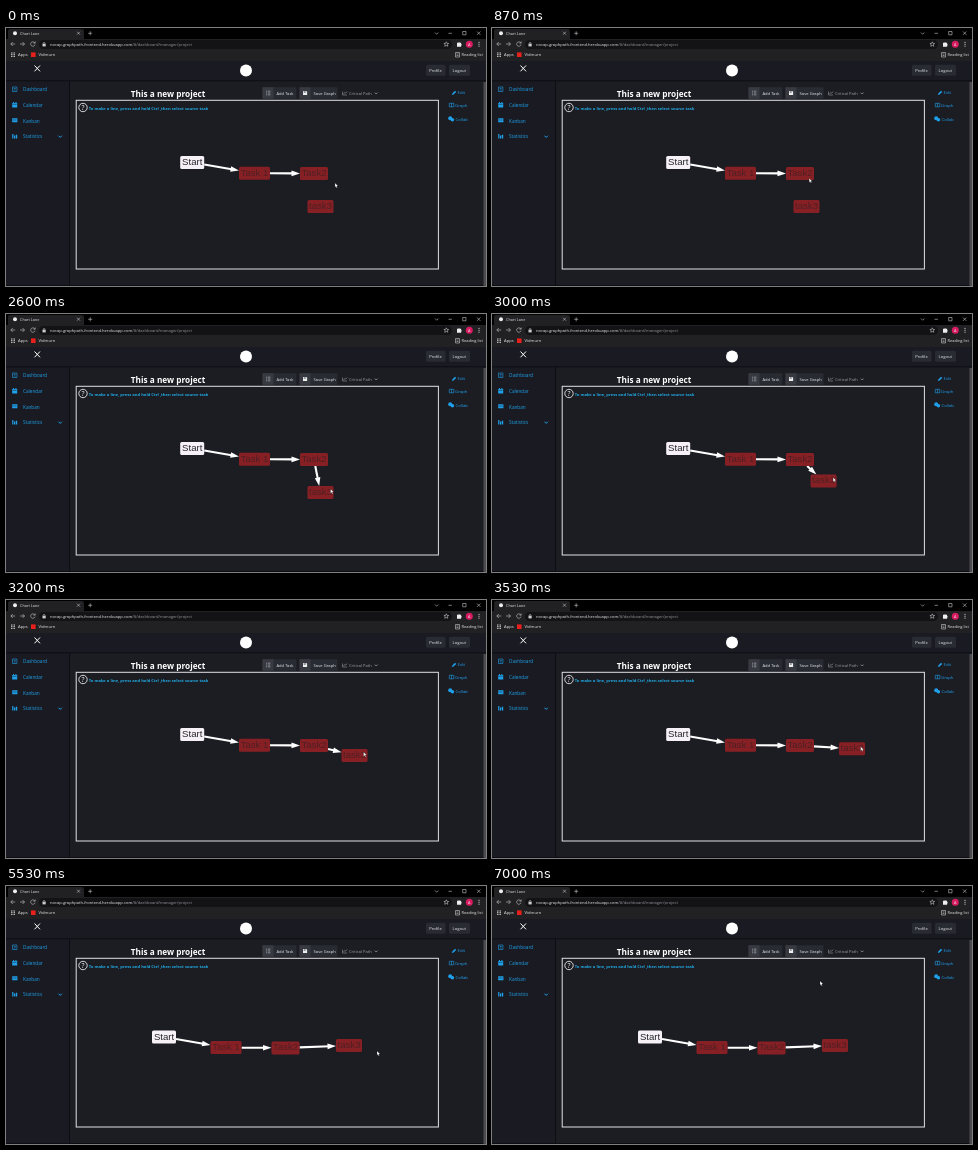
Write an HTML page that moves like this. It is 480 px wide and 258 px high and loops after 7070 ms.

```html
<!DOCTYPE html>
<html lang="en">
<head>
<meta charset="utf-8">
<title>Project graph</title>
<style>
  html, body { margin: 0; width: 100%; height: 100%; overflow: hidden; background: #1c1c23; }
  svg { display: block; width: 100%; height: 100%; }
  text { font-family: "Open Sans", "Noto Sans", sans-serif; font-size: 4.2px; fill: #e8e8ea; }
  .line { fill: none; stroke: #c8c8cc; stroke-width: .6; }
  .blue text { fill: #1fa0ea; font-size: 4.7px; font-weight: 500; }
  .blue .side { font-size: 4.3px; }
  .blue path, .blue circle { fill: #1fa0ea; }
  .blue .line { fill: none; stroke: #1fa0ea; }
  .dim { fill: #94969c; }
  .button { fill: #292b32; }
  .node text { font: 9.6px "Liberation Sans", Arial, sans-serif; fill: #4f1f23; text-anchor: middle; }
</style>
</head>
<body>
<svg viewBox="0 0 480 258">
  <!-- browser -->
  <rect width="480" height="33" fill="#000"/>
  <path d="M2 11V3q0-2 2-2H76q2 0 2 2V11H480V33H0V11Z" fill="#212123"/>
  <rect x="33" y="12" width="413" height="9" rx="4.5" fill="#131315"/>
  <circle cx="9" cy="5.2" r="2" fill="#eee"/>
  <text x="14" y="6.7" style="font-size:3.8px">Chart Lane</text>
  <path class="line" d="M71 3.7l3 3m0-3l-3 3M82.2 5.300h4m-2-2v4M429 4.500l1.700 1.700 1.700-1.700M442.500 5.300h3.400M456.700 3.500h3.300v3.300h-3.300zM471 3.500l3.400 3.400m0-3.400l-3.400 3.400"/>
  <path class="line" d="M9.200 16H4.800m2-2l-2 2 2 2M14 16h4.500m-2-2l2 2-2 2M28.800 15a2.200 2.200 0 1 0 .2 1.600M29.200 13.500v1.700h-1.700"/>
  <path d="M36.500 15.800h3.200v2.600h-3.200z" fill="#ccc"/>
  <path class="line" d="M37.200 16v-1a1 1 0 0 1 1.800 0v1"/>
  <text x="44" y="17.800" style="font-size:4.1px">nocap-graphpath-frontend.herokuapp.com<tspan class="dim">/#/dashboard/manager/project</tspan></text>
  <path class="line" d="M440.300 13.800l.7 1.600 1.700.1-1.300 1.100.4 1.700-1.500-.9-1.500.9.4-1.700-1.300-1.100 1.700-.1z"/>
  <path d="M451 14.800h1.200a.9.900 0 0 1 1.700 0h1.200v1.200a.9.900 0 0 1 0 1.700v1h-4.100z" fill="#eee"/>
  <circle cx="463.300" cy="16.200" r="3.500" fill="#d81b60"/>
  <text x="463.300" y="17.600" text-anchor="middle" style="font-size:3.8px">A</text>
  <path d="M473 13.900v5" stroke="#ddd" stroke-width="1" stroke-dasharray="1 .9"/>
  <path d="M5 25h4M5 26.700h4M5 28.400h4" stroke="#ccc" stroke-width="1" stroke-dasharray="1 .5"/>
  <text x="12" y="28">Apps</text>
  <rect x="25" y="24.400" width="4.600" height="4.600" fill="#e8201c"/>
  <text x="32.500" y="28">Vidmurn</text>
  <path class="line" d="M449.500 24.500h4v4.500h-4zM450.500 26h2M450.500 27.500h2"/>
  <text x="455.500" y="28" style="font-size:4px">Reading list</text>

  <!-- page frame -->
  <rect y="33" width="480" height="20" fill="#1a1b22"/>
  <rect y="53" width="63" height="205" fill="#1a1b22"/>
  <path d="M0 52.800H480M63.500 53V258M0 257.500H480" stroke="#0c0d12" stroke-width="1"/>
  <rect x="477.500" y="54" width="2.500" height="204" fill="#4c4c50"/>
  <path d="M28.500 37.500l5.500 5.800m0-5.800l-5.500 5.800" stroke="#fff" stroke-width="1"/>
  <circle cx="240" cy="42.500" r="6" fill="#fff"/>
  <rect class="button" x="420" y="36.700" width="19.500" height="11" rx="1.500"/>
  <rect class="button" x="443" y="36.700" width="21" height="11" rx="1.500"/>
  <text x="423.200" y="43.800">Profile</text>
  <text x="446.500" y="43.800">Logout</text>

  <!-- menus -->
  <g class="blue">
    <path class="line" d="M6.500 59h4.400v4.500H6.500zM7.700 60.500h2M7.700 62h2"/>
    <path d="M6.200 75h5v4.500h-5zM7 74h1v1h-1zM9.400 74h1v1h-1zM6.200 90.300h5.200v4h-5.200zM6.200 106h1.200v4.600H6.200zM8 107.500h1.200v3.100H8zM9.800 106.700h1.400v3.900h-1.400z"/>
    <path d="M6.700 76.300h4M6.700 92h4" stroke="#1a1b22" stroke-width=".5"/>
    <text x="17" y="63.400">Dashboard</text>
    <text x="17" y="79">Calendar</text>
    <text x="17" y="94.700">Kanban</text>
    <text x="17" y="110.300">Statistics</text>
    <path class="line" d="M52.500 107.700l1.700 1.700 1.700-1.700" style="stroke-width:1"/>
    <path d="M445.800 67l.5-1.600 2.700-2.700 1.200 1.200-2.700 2.700z"/>
    <path class="line" d="M443.300 75.300h4.500v3.500h-4.500zM445.500 75.300v3.500"/>
    <circle cx="444.200" cy="90.300" r="2"/><circle cx="446.400" cy="91.700" r="1.800"/>
    <text class="side" x="451.500" y="66.400">Edit</text>
    <text class="side" x="449" y="79">Graph</text>
    <text class="side" x="449.500" y="92.500">Collab</text>
  </g>

  <!-- project toolbar -->
  <text x="124.800" y="68.500" style="font-size:8.26px;font-weight:700;fill:#fff">This a new project</text>
  <rect class="button" x="256.500" y="59.300" width="34" height="11.500" rx="1"/>
  <rect class="button" x="293.500" y="59.300" width="38" height="11.500" rx="1"/>
  <path d="M256.500 59.300h11v11.500h-11zM293.500 59.300h11v11.500h-11z" fill="#383a42"/>
  <path class="line" d="M260 63.200h1m.8 0h2.500M260 65h1m.8 0h2.500M260 66.800h1m.8 0h2.500"/>
  <path d="M297 63h3.300l.8.800v3.300H297z" fill="#eee"/>
  <path d="M297.700 63.500h2v1h-2z" fill="#383a42"/>
  <text x="270.500" y="66.800" style="font-size:4.1px">Add Task</text>
  <text x="307.500" y="66.800">Save Graph</text>
  <path class="line" d="M336.500 63.500v3.500h4.500M337.500 66l1.200-1.600 1 .8 1.500-1.700" style="stroke:#94969c"/>
  <text x="343" y="66.800" style="font-size:4.1px;fill:#a2a4aa">Critical Path</text>
  <path class="line" d="M368.800 64.600l1.400 1.400 1.400-1.400"/>

  <!-- graph -->
  <rect x="70.200" y="72.300" width="362.200" height="168.700" fill="none" stroke="#e0e0e4" stroke-width="1"/>
  <circle cx="77" cy="79.500" r="4.200" fill="none" stroke="#fff" stroke-width=".8"/>
  <text x="77" y="82" text-anchor="middle" style="font-size:7px;fill:#fff">?</text>
  <text x="82.700" y="82.300" style="font-size:4.12px;font-weight:700;fill:#22aee8">To make a line, press and hold Ctrl ,then select source task</text>
  <g id="edges" fill="#fff" stroke="#fff"></g>
  <g id="nodes"></g>
  <path id="cursor" d="M0 0V4.300L1 3.400 1.700 4.900 2.400 4.500 1.800 3.100H3.100Z" fill="#fff" stroke="#111" stroke-width=".25"/>
</svg>
<script>
const LOOP = 7070, LINK_START = 870, LINK_END = 1470, RELAYOUT = 5530;
const HALF_HEIGHT = 6.5;

// Keyframes: time, x, y
const cursorPath = [
  [0, 329, 155], [400, 317, 147], [800, 317, 147], [1470, 318.5, 177], [1800, 318.5, 177],
  [2070, 329, 167], [2400, 329, 167], [2600, 324.5, 175], [2800, 324.5, 175],
  [3200, 357.5, 152], [3600, 371, 145.5], [4270, 371, 145.5], [4530, 371, 144],
  [5000, 371, 144], [5330, 371, 165], [6340, 371, 165], [7000, 328, 95]
];
const dragPath = [
  [2800, 314.5, 178.5], [3200, 348.5, 155.5], [3600, 362.5, 147.3],
  [4270, 362.5, 147.3], [4530, 363, 146]
];

const byId = id => document.getElementById(id);

function add(parent, tag, attributes, content = "") {
  const element = document.createElementNS("http://www.w3.org/2000/svg", tag);
  for (const key in attributes) element.setAttribute(key, attributes[key]);
  element.textContent = content;
  return parent.appendChild(element);
}

function along(path, time) {
  const next = path.findIndex(key => key[0] > time);
  if (next === 0) return path[0].slice(1);
  if (next < 0) return path.at(-1).slice(1);
  const [t0, x0, y0] = path[next - 1], [t1, x1, y1] = path[next];
  const k = (time - t0) / (t1 - t0);
  return [x0 + (x1 - x0) * k, y0 + (y1 - y0) * k];
}

const nodes = [["Start", 12], ["Task 1", 15.5], ["Task2", 14], ["task3", 13]].map(([label, half], i) => {
  const group = add(byId("nodes"), "g", { class: "node" });
  add(group, "rect", {
    x: -half, y: -HALF_HEIGHT, width: half * 2, height: HALF_HEIGHT * 2, rx: 1.5,
    fill: i ? "#872024" : "#f6f1f6"
  });
  const text = add(group, "text", { y: 2.5 }, label);
  if (!i) text.style.fill = "#25252b";
  return { group, half };
});

const edges = [0, 1, 2].map(() => ({
  line: add(byId("edges"), "path", { "stroke-width": 2.1 }),
  head: add(byId("edges"), "path", { d: "M0 0L-8.5 -2.8V2.8Z", stroke: "none" })
}));

// Joins two box centres, trimmed at the box borders.
function drawEdge({ line, head }, [x0, y0], half0, [x1, y1], half1, toPoint) {
  const dx = x1 - x0, dy = y1 - y0;
  const trim = half => Math.min(half / Math.abs(dx || 1e-6), HALF_HEIGHT / Math.abs(dy || 1e-6));
  const start = trim(half0), end = toPoint ? 1 : 1 - trim(half1);
  const visible = end > start;
  line.style.display = head.style.display = visible ? "" : "none";
  if (!visible) return;
  const tipX = x0 + dx * end, tipY = y0 + dy * end;
  const length = Math.hypot(dx, dy), back = Math.min(6, length * (end - start));
  line.setAttribute("d", `M${x0 + dx * start} ${y0 + dy * start}L${tipX - dx / length * back} ${tipY - dy / length * back}`);
  head.setAttribute("transform", `translate(${tipX} ${tipY}) rotate(${Math.atan2(dy, dx) * 180 / Math.PI})`);
}

function draw(time) {
  const cursor = along(cursorPath, time);
  const places = time < RELAYOUT
    ? [[186.2, 134.4], [248.5, 145.2], [308, 145.5], along(dragPath, time)]
    : [[158, 151], [220, 161.6], [279.5, 161.9], [343, 159.6]];
  nodes.forEach(({ group }, i) => group.setAttribute("transform", `translate(${places[i]})`));
  edges.forEach((edge, i) => {
    const linking = i === 2 && time < LINK_END;
    const hidden = i === 2 && time < LINK_START;
    drawEdge(edge, places[i], nodes[i].half, hidden ? places[i] : linking ? cursor : places[i + 1], nodes[i + 1].half, linking);
  });
  byId("cursor").setAttribute("transform", `translate(${cursor})`);
}

const began = performance.now();
function tick() {
  draw((performance.now() - began) % LOOP);
  requestAnimationFrame(tick);
}
tick();
</script>
</body>
</html>
```
